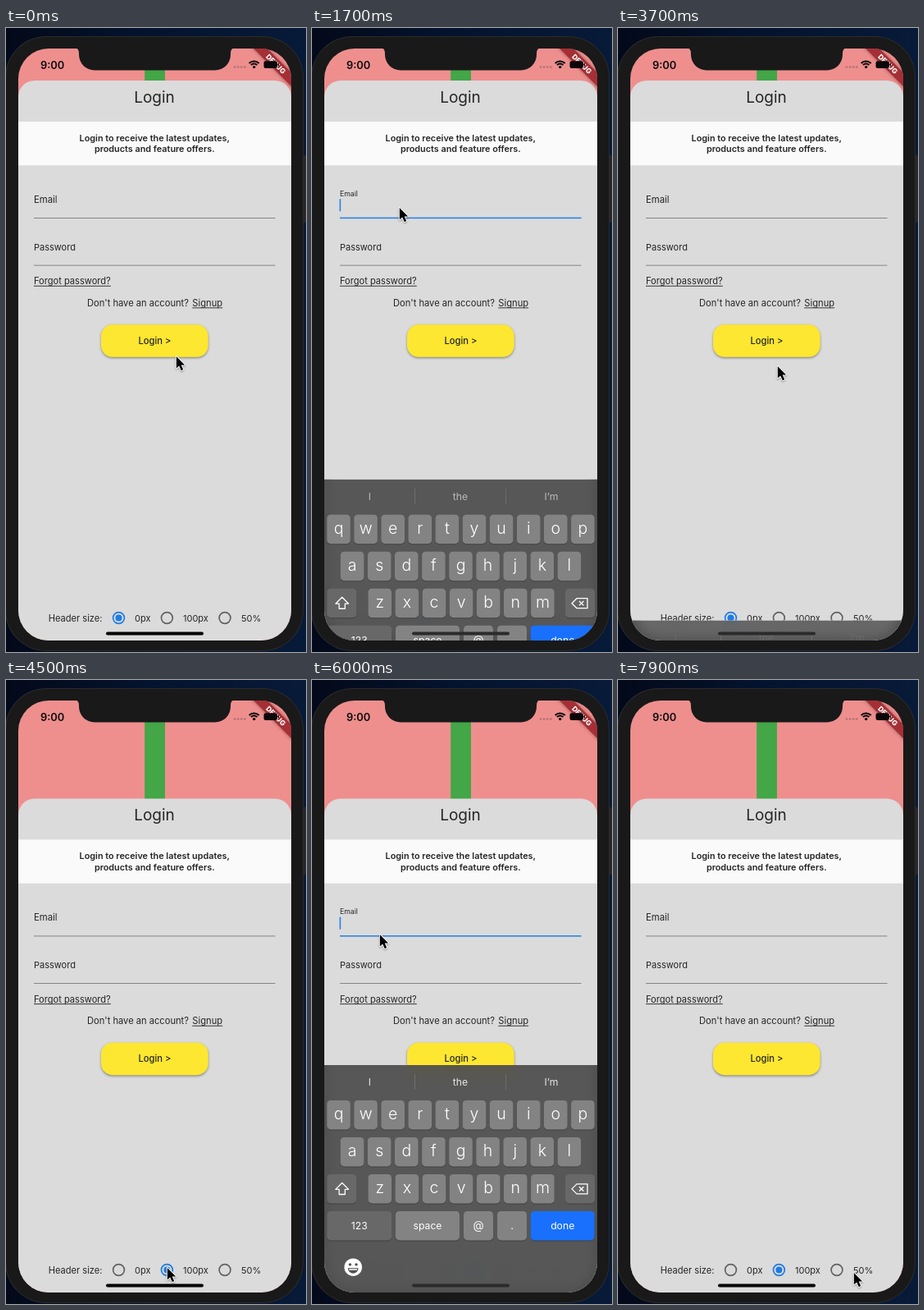
An HTML page with a canvas for the animation above (8000 ms loop, 366 by 760 pixels).

```html
<!DOCTYPE html>
<html lang="en">
<head>
<meta charset="utf-8">
<title>Login form</title>
<style>
html, body { margin: 0; width: 100%; height: 100%; overflow: hidden; background: #050d1c; }
canvas { display: block; width: 100%; height: 100%; }
</style>
</head>
<body>
<canvas id="stage" width="366" height="760"></canvas>
<script>
const canvas = document.getElementById('stage');
const ctx = canvas.getContext('2d');
const LOOP = 8000, STEP = 100;
const SCREEN = { x: 15, y: 25, w: 333, h: 721 };
const BOTTOM = SCREEN.y + SCREEN.h;
const INK = '#252525', BLUE = '#2b86e0';

// Each focus: keyboard opens at `on` and closes at `off`; `rest` is its final top edge.
const FOCUS = [
  { on: 1550, off: 3450, rest: 467 },
  { on: 5635, off: 6950, rest: 467 }
];
const HEADER_SWITCH = 4500;

// Pointer path: time, x, y
const POINTER = [
  [0, 207, 399], [400, 207, 399], [1300, 106, 218], [1900, 106, 218],
  [2800, 185, 421], [3300, 192, 412], [3700, 194, 411], [4300, 196, 715],
  [4600, 196, 715], [5300, 86, 280], [5550, 82, 309], [6100, 82, 309],
  [6750, 180, 420], [7200, 182, 424], [7900, 287, 721]
];

const clamp = v => Math.min(1, Math.max(0, v));
const mix = (a, b, p) => a + (b - a) * p;
const easeOut = p => 1 - Math.pow(1 - clamp(p), 3);
const smooth = p => p * p * (3 - 2 * p);

function box(x, y, w, h, r, color) {
  ctx.beginPath();
  ctx.roundRect(x, y, w, h, r);
  ctx.fillStyle = color;
  ctx.fill();
}

function disc(x, y, r, color) {
  ctx.beginPath();
  ctx.arc(x, y, r, 0, Math.PI * 2);
  ctx.fillStyle = color;
  ctx.fill();
}

function poly(points, close) {
  ctx.beginPath();
  points.forEach(([x, y], i) => i ? ctx.lineTo(x, y) : ctx.moveTo(x, y));
  if (close) ctx.closePath();
}

function label(str, x, y, size, { color = INK, weight = 400, align = 'left', line = false } = {}) {
  ctx.font = `${weight} ${size}px Inter, Roboto, sans-serif`;
  ctx.textAlign = align;
  ctx.fillStyle = color;
  ctx.fillText(str, x, y);
  if (line) ctx.fillRect(x, y + 1.4, ctx.measureText(str).width, 0.9);
}

function pointerAt(t) {
  let i = 0;
  while (i < POINTER.length - 2 && t > POINTER[i + 1][0]) i++;
  const a = POINTER[i], b = POINTER[i + 1];
  const p = smooth(clamp((t - a[0]) / (b[0] - a[0])));
  return [mix(a[1], b[1], p), mix(a[2], b[2], p)];
}

function stateAt(t) {
  const s = { header: t < HEADER_SWITCH ? 0 : 1, focus: 0, focused: false, caret: 0, top: BOTTOM, fade: 1, shown: 0 };
  for (const f of FOCUS) {
    if (t < f.on || t > f.off + 600) continue;
    const open = easeOut((t - f.on) / 450);
    const shut = t > f.off ? easeOut((t - f.off) / 450) : 0;
    s.shown = open * (1 - shut);
    s.top = mix(BOTTOM, f.rest, s.shown);
    s.fade = shut;
    s.focused = t < f.off;
    s.focus = clamp((t - f.on) / 150) * (1 - clamp((t - f.off) / 180));
    const phase = (t - f.on) % 1000;
    s.caret = phase < 500 ? 1 : phase < 750 ? 1 - (phase - 500) / 250 : clamp((phase - 850) / 150);
  }
  return s;
}

function drawPhone() {
  const sky = ctx.createLinearGradient(0, 0, 366, 0);
  sky.addColorStop(0, '#03091a');
  sky.addColorStop(0.5, '#04142f');
  sky.addColorStop(1, '#071a38');
  ctx.fillStyle = sky;
  ctx.fillRect(0, 0, 366, 760);
  box(361, 155, 5, 82, 1, '#27272a');
  box(-1, 10, 364, 749, 50, '#2b2b2c');
  box(0, 11, 362, 747, 49, '#191919');
}

function drawSheet(s) {
  const d = s.header * 80.4;
  ctx.save();
  ctx.translate(0, d);
  box(15, 64, 333, 760, [20, 20, 0, 0], '#dbdbdb');
  label('Login', 181, 90.5, 19, { align: 'center' });
  ctx.fillStyle = '#fafafa';
  ctx.fillRect(15, 114, 333, 53.3);
  const bold = { weight: 600, align: 'center' };
  label('Login to receive the latest updates,', 181.3, 137.6, 10.85, bold);
  label('products and feature offers.', 181.3, 151.2, 10.85, bold);

  label('Email', 34, mix(213, 204.8, s.focus), mix(11.3, 8.7, s.focus));
  ctx.fillStyle = s.focused ? BLUE : '#858585';
  ctx.fillRect(34, s.focused ? 230.6 : 231, 294.5, s.focused ? 1.6 : 1);
  if (s.focused) {
    ctx.globalAlpha = s.caret;
    box(33.5, 208, 1.7, 15.5, 0.8, BLUE);
    ctx.globalAlpha = 1;
  }
  label('Password', 34, 270.6, 11);
  ctx.fillStyle = '#858585';
  ctx.fillRect(34, 288.6, 294.5, 1);
  label('Forgot password?', 34, 312.4, 11.1, { line: true });
  label("Don't have an account?", 99, 339, 11.15);
  label('Signup', 227.3, 339, 11.2, { line: true });

  ctx.save();
  ctx.shadowColor = 'rgba(0,0,0,.4)';
  ctx.shadowBlur = 3;
  ctx.shadowOffsetY = 1.3;
  box(116, 361.3, 130.7, 39.5, 14, '#fde730');
  ctx.restore();
  label('Login >', 181.4, 384.8, 11.2, { weight: 500, align: 'center' });
  ctx.restore();
}

function drawOptions(selected) {
  label('Header size:', 51.7, 722.5, 11.1);
  [[137.5, 157, '0px'], [196.4, 216, '100px'], [267, 287, '50%']].forEach(([x, tx, str], i) => {
    const on = i === selected;
    ctx.beginPath();
    ctx.arc(x, 718.5, 6.9, 0, Math.PI * 2);
    ctx.lineWidth = 1.7;
    ctx.strokeStyle = on ? '#1f7be6' : '#626262';
    ctx.stroke();
    if (on) disc(x, 718.5, 4, '#1f7be6');
    label(str, tx, 722.5, 11);
  });
}

function key(x, y, w, color, str, size, dy = 4.3, weight = 400) {
  box(x, y + 1, w, 35.5, 4.5, '#404040');
  box(x, y, w, 35.5, 4.5, color);
  if (str) label(str, x + w / 2, y + 17.8 + dy, size, { color: '#fff', align: 'center', weight });
}

function drawKeys(s) {
  const light = '#838383', dark = '#686868';
  ctx.globalAlpha = s.shown > 0.95 ? 1 : clamp(s.shown * 1.05) * 0.95;
  const hint = { color: '#e6e6e6', align: 'center' };
  label('I', 70.5, 25.5, 12.2, hint);
  label('the', 181, 25.5, 12.2, hint);
  label('I’m', 292, 25.5, 12.2, hint);
  ctx.globalAlpha = 1;
  ctx.fillStyle = '#6d6d6d';
  ctx.fillRect(125, 11, 1, 19);
  ctx.fillRect(236, 11, 1, 19);

  [['qwertyuiop', 18.2], ['asdfghjkl', 34.8], ['zxcvbnm', 68.5]].forEach(([row, left], r) => {
    [...row].forEach((c, i) => key(left + i * 33.1, 43 + r * 45, 28.6, light, c, 19.5, 5.8, 300));
  });
  key(18.2, 133, 36, dark);
  key(309, 133, 36, dark);
  key(18.2, 178, 79, dark, '123', 12.2);
  key(102, 178, 78, light, 'space', 12.2);
  key(185, 178, 36, light, '@', 13.5);
  key(226, 178, 36, light, '.', 13);
  key(266.7, 178, 78, '#1870fd', 'done', 12.2);

  ctx.strokeStyle = '#fff';
  ctx.lineWidth = 1.3;
  ctx.lineJoin = 'round';
  poly([[36.7, 143.6], [44.6, 151.5], [40.3, 151.5], [40.3, 157.6], [33.1, 157.6], [33.1, 151.5], [28.8, 151.5]], true);
  ctx.stroke();
  poly([[317, 151], [323, 145], [336, 145], [336, 157], [323, 157]], true);
  ctx.stroke();
  poly([[326, 148.3], [331.4, 153.7]]);
  ctx.stroke();
  poly([[331.4, 148.3], [326, 153.7]]);
  ctx.stroke();

  const ink = '#505050';
  disc(50.2, 246.3, 10.8, '#fff');
  disc(46.4, 243, 1.7, ink);
  disc(54, 243, 1.7, ink);
  ctx.beginPath();
  ctx.arc(50.2, 247.4, 6.4, 0, Math.PI);
  ctx.closePath();
  ctx.fillStyle = ink;
  ctx.fill();
  ctx.fillStyle = '#fff';
  ctx.fillRect(45.3, 248.4, 9.8, 1.5);
}

function drawKeyboard(s) {
  if (s.shown < 0.002) return;
  ctx.save();
  ctx.beginPath();
  ctx.rect(SCREEN.x, s.top, SCREEN.w, BOTTOM - s.top);
  ctx.clip();
  ctx.filter = 'blur(9px)';
  ctx.drawImage(canvas, 0, 0);
  ctx.filter = 'none';
  ctx.fillStyle = `rgba(78,78,78,${mix(0.93, 0.79, s.fade)})`;
  ctx.fillRect(SCREEN.x, s.top, SCREEN.w, BOTTOM - s.top);
  ctx.translate(0, s.top);
  drawKeys(s);
  ctx.restore();
}

function drawStatus() {
  // corner ribbon
  ctx.save();
  ctx.translate(329.3, 43.7);
  ctx.rotate(Math.PI / 4);
  ctx.shadowColor = 'rgba(0,0,0,.4)';
  ctx.shadowBlur = 4;
  ctx.fillStyle = '#a52f35';
  ctx.fillRect(-50, -5.8, 100, 11.8);
  ctx.shadowColor = 'transparent';
  label('DEBUG', 0, 3.2, 8.6, { color: '#fff', weight: 800, align: 'center' });
  ctx.restore();

  label('9:00', 42, 49.5, 12.9, { weight: 600, color: '#0c0c0c' });
  for (let i = 0; i < 4; i++) disc(279 + i * 4.1, 47.6, 1.45, '#b97476');
  ctx.strokeStyle = '#080808';
  ctx.lineWidth = 2;
  [8.3, 5.2].forEach(r => {
    ctx.beginPath();
    ctx.arc(302.7, 48.7, r, -Math.PI * 0.76, -Math.PI * 0.24);
    ctx.stroke();
  });
  disc(302.7, 47.6, 1.7, '#080808');
  box(314.5, 40.2, 16.5, 8.8, 2.3, '#0b0709');
  box(331.6, 43, 1.4, 3.4, 0.7, '#0b0709');
}

function drawNotch() {
  ctx.beginPath();
  ctx.moveTo(83, 24);
  ctx.quadraticCurveTo(89, 24, 89, 31);
  ctx.arcTo(89, 51.5, 109, 51.5, 19);
  ctx.arcTo(274, 51.5, 274, 31, 19);
  ctx.lineTo(274, 31);
  ctx.quadraticCurveTo(274, 24, 280, 24);
  ctx.closePath();
  ctx.fillStyle = '#191919';
  ctx.fill();
}

function drawPointer(x, y) {
  ctx.save();
  ctx.translate(x + 0.8, y + 1);
  poly([[0, 0], [0, 14.6], [3.4, 11.4], [6, 17.2], [8.4, 16.1], [5.9, 10.6], [10.4, 10.4]], true);
  ctx.shadowColor = 'rgba(0,0,0,.35)';
  ctx.shadowBlur = 2;
  ctx.shadowOffsetY = 1;
  ctx.lineJoin = 'round';
  ctx.lineWidth = 2;
  ctx.strokeStyle = '#fff';
  ctx.stroke();
  ctx.shadowColor = 'transparent';
  ctx.fillStyle = '#000';
  ctx.fill();
  ctx.restore();
}

function draw(t) {
  const s = stateAt(t);
  drawPhone();
  ctx.save();
  ctx.beginPath();
  ctx.roundRect(SCREEN.x, SCREEN.y, SCREEN.w, SCREEN.h, 37);
  ctx.clip();
  ctx.fillStyle = '#ee8f8e';
  ctx.fillRect(SCREEN.x, SCREEN.y, SCREEN.w, SCREEN.h);
  ctx.fillStyle = '#43a647';
  ctx.fillRect(169.2, 25, 24.8, 140);
  drawSheet(s);
  drawOptions(s.header);
  drawKeyboard(s);
  drawStatus();
  box(122, 735.5, 119, 4, 2, s.shown > 0.05 ? '#2b2b2b' : '#000');
  ctx.restore();
  drawNotch();
  drawPointer(...pointerAt(t));
}

const start = performance.now();
function tick() {
  const t = (performance.now() - start) % LOOP;
  draw(Math.floor(t / STEP) * STEP);
  requestAnimationFrame(tick);
}
tick();
</script>
</body>
</html>
```
